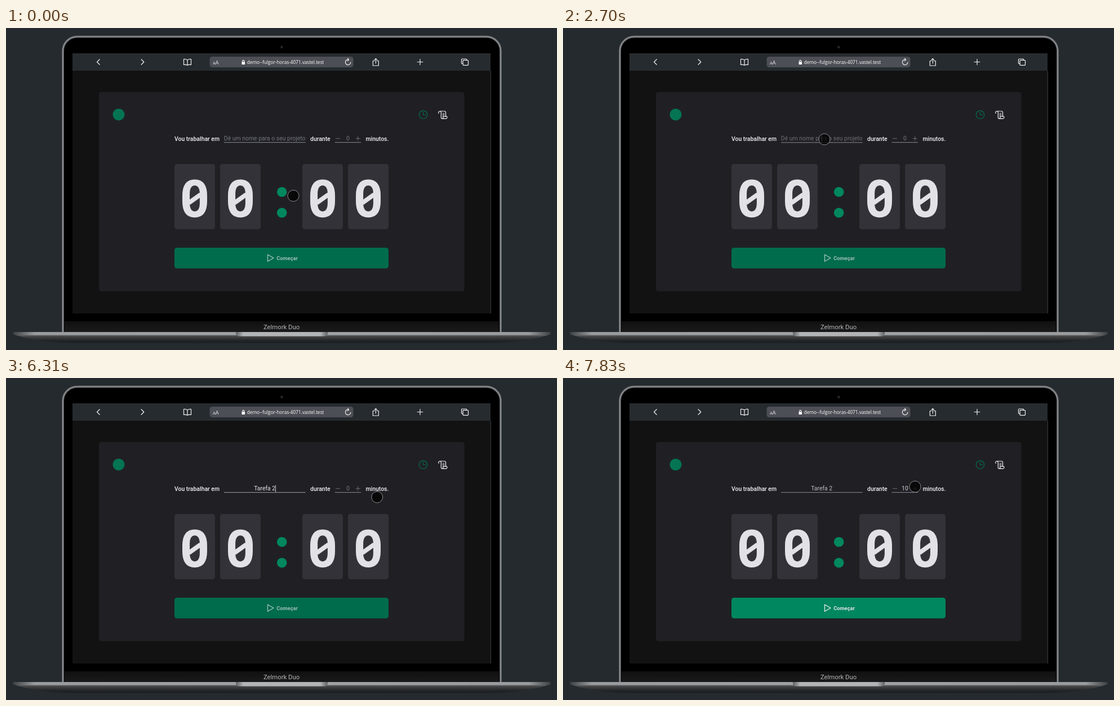
An HTML page that plays this animation: 978x573 px, repeating every 8 s.

```html
<!DOCTYPE html>
<html lang="pt-BR">
<head>
<meta charset="utf-8">
<title>Timer</title>
<style>
  html, body { margin: 0; width: 100%; height: 100%; overflow: hidden; background: #242a2e; }
  svg { display: block; width: 100%; height: 100%; }
  text { font: 10.43px Roboto, sans-serif; fill: #e1e1e6; white-space: pre; }
  .label { font-weight: 500; fill: #f0f0f5; }
  .mid { text-anchor: middle; }
  .muted { fill: #74747f; }
  .icon { fill: none; stroke: #f2f2f4; stroke-width: 1.2; stroke-linecap: round; stroke-linejoin: round; }
  .rule { fill: #7c7c8a; }
  #url { font: 8.2px "Open Sans", sans-serif; fill: #fff; }
  #model { font-size: 11.3px; fill: #b4b5b6; }
  #start text { font-size: 9.27px; font-weight: 700; }
</style>
</head>
<body>
<svg viewBox="0 0 978 573">
  <defs>
    <linearGradient id="chin" x2="0" y2="1">
      <stop stop-color="#101011"/><stop offset="1" stop-color="#1b1b1c"/>
    </linearGradient>
    <linearGradient id="deck">
      <stop stop-color="#3d4042"/><stop offset=".04" stop-color="#999b9d"/>
      <stop offset=".5" stop-color="#a0a2a4"/>
      <stop offset=".96" stop-color="#999b9d"/><stop offset="1" stop-color="#3d4042"/>
    </linearGradient>
    <linearGradient id="belly" x2="0" y2="1">
      <stop stop-color="#707274"/><stop offset=".25" stop-color="#434547"/>
      <stop offset=".7" stop-color="#232527"/><stop offset="1" stop-color="#1b1e20"/>
    </linearGradient>
    <linearGradient id="notch">
      <stop stop-color="#5d5f62"/><stop offset=".08" stop-color="#b2b4b6"/>
      <stop offset=".92" stop-color="#b2b4b6"/><stop offset="1" stop-color="#5d5f62"/>
    </linearGradient>
    <clipPath id="lidClip"><path d="M0 0H978V541H0Z"/></clipPath>
    <g id="card">
      <rect x="-36" y="-61.3" width="72" height="116" rx="4.6" fill="#323238"/>
      <path fill="#e1e1e6" fill-rule="evenodd" d="M-22-5.2Q-22-19.3-16.4-26.6T0-33.9Q10.8-33.9 16.4-26.6T22-5.2V5.2Q22 19.3 16.4 26.6T0 33.9Q-10.8 33.9-16.4 26.6T-22 5.2Z
        M-8.9-8V8Q-8.9 15.5-6.6 19.3T0 23.1Q4.3 23.1 6.6 19.3T8.9 8V-8Q8.9-15.500 6.6-19.3T0-23.1Q-4.3-23.1-6.6-19.3T-8.9-8Z"/>
      <path d="M-10.500 8L10.500-7" stroke="#e1e1e6" stroke-width="8"/>
    </g>
  </defs>

  <rect width="978" height="573" fill="#242a2e"/>

  <g clip-path="url(#lidClip)">
    <rect x="99" y="13.5" width="781" height="570" rx="27" fill="#5a5c5f"/>
    <rect x="100.9" y="15.4" width="777.2" height="570" rx="25.3" fill="none" stroke="#8d8f92" stroke-width="1.7"/>
    <rect x="103" y="17.5" width="773" height="570" rx="23" fill="#000"/>
    <rect x="104" y="522" width="771" height="20" fill="url(#chin)"/>
  </g>
  <circle cx="489.3" cy="34" r="2.4" fill="#232427"/>
  <text id="model" class="mid" x="489" y="536">Zelmork Duo</text>

  <path d="M13 545C40 555 80 560.5 130 560.5H848C898 560.5 938 555 966 545Z" fill="url(#belly)"/>
  <path d="M12.5 541H966.5V544Q966 546.5 960 546.5H19Q13 546.5 12.5 544Z" fill="url(#deck)"/>
  <path d="M408 541H571V543Q571 548.5 564 548.5H415Q408 548.5 408 543Z" fill="url(#notch)"/>

  <rect x="118" y="76" width="742" height="432" fill="#121212"/>
  <rect x="118" y="45" width="742" height="31" fill="#262b2f"/>
  <path d="M860.3 76V508" stroke="#404347"/>

  <rect x="361.5" y="51" width="255" height="19" rx="4.5" fill="#4c4f55"/>
  <text x="367" y="65" style="font-size:7.5px">A</text>
  <text x="371.5" y="65" style="font-size:9.5px">A</text>
  <rect x="418.5" y="60.3" width="5.6" height="4.8" rx=".8" fill="#fff"/>
  <path class="icon" d="M419.7 60.5V59a1.6 1.6 0 0 1 3.2 0V60.5"/>
  <text id="url" class="mid" x="496" y="64">demo--fulgor-horas-4071.vastel.test</text>
  <g class="icon">
    <path d="M166.3 55.8L161.5 60.5L166.3 65.2M240 55.8L244.8 60.5L240 65.2"/>
    <path d="M322 57Q319 55 315.5 55.5V65.3Q319 64.8 322 66.3Q325 64.8 328.5 65.3V55.5Q325 55 322 57V66"/>
    <path d="M608 56.3A4.7 4.7 0 1 0 611.8 61M606.5 54.2L608.6 56.4L606.3 58.6"/>
    <path d="M654 58.5H651.3V67H661.3V58.5H658.7M656.3 63V54.5M653.8 56.8L656.3 54.3L658.8 56.8"/>
    <path d="M735 55.7V65.3M730.2 60.5H739.8"/>
    <path d="M810.8 63.5H809.5Q808.5 63.5 808.5 62.5V56Q808.5 55 809.5 55H816.5Q817.5 55 817.5 56V57"/>
    <rect x="811" y="57.3" width="9.5" height="9" rx="1.3"/>
  </g>

  <rect x="165" y="114" width="648.5" height="354.5" rx="4.6" fill="#202024"/>
  <circle cx="200" cy="154" r="10.5" fill="#047453"/>
  <g class="icon" style="stroke:#04704f">
    <circle cx="740.5" cy="154.3" r="7.2"/><path d="M740.5 150V154.5H744.8"/>
  </g>
  <path class="icon" d="M768.2 151.8A2.3 2.3 0 1 1 772.3 150.3V159A2.3 2.3 0 0 0 774.6 161.3H780.8A2.3 2.3 0 0 0 782.4 157.4H775.3A2.3 2.3 0 0 1 774.6 161.3
    M770 148H778.2A2.3 2.3 0 0 1 780.5 150.3V157.4M775 152H778M775 154.7H778"/>

  <text class="label" x="299" y="200.7">Vou trabalhar em</text>
  <text id="hint" class="muted mid" x="459.2" y="200">Dê um nome para o seu projeto</text>
  <text id="task" y="200"></text>
  <rect id="caret" y="190.5" width=".8" height="12.5" fill="#e1e1e6"/>
  <rect id="line" class="rule" x="387" y="203" width="144.7" height="1.15"/>
  <text class="label" x="540" y="200.7">durante</text>
  <rect class="rule" x="583.7" y="203" width="46.3" height="1.15"/>
  <path d="M585 196.700H593M620.7 196.700H628.7M624.7 192.700V200.7" stroke="#74747f" stroke-width=".9"/>
  <text id="minutes" class="mid" x="606.9" y="200">0</text>
  <text class="label" x="638.5" y="200.7">minutos.</text>

  <use href="#card" x="335" y="303.3"/>
  <use href="#card" x="416" y="303.3"/>
  <use href="#card" x="562" y="303.3"/>
  <use href="#card" x="643" y="303.3"/>
  <g fill="#00875f"><circle cx="489.7" cy="291.7" r="8.8"/><circle cx="489.7" cy="328.7" r="8.8"/></g>

  <g id="start">
    <rect id="face" x="299" y="391" width="380" height="36.8" rx="4.6"/>
    <g id="caption">
      <path class="icon" d="M464.5 403.3V415.3L475 409.3Z"/>
      <text x="480.3" y="412.7">Começar</text>
    </g>
  </g>

  <g id="cursor">
    <circle r="10" fill="#000" fill-opacity=".75" stroke="#8b8b8d"/>
    <circle id="press" r="8" fill="#8c8900"/>
  </g>
</svg>
<script>
const LOOP = 8000, STEP = 70, FIELD_CENTER = 459.2;
const $ = id => document.getElementById(id);
const pen = document.createElement('canvas').getContext('2d');
const between = (t, a, b) => t >= a && t < b;
const latest = (list, t) => list.filter(item => item[0] <= t).pop();

const typing = [[0, ''], [2960, 'T'], [3180, 'Ta'], [3580, 'Tar'], [3710, 'Tare'],
  [4110, 'Taref'], [4180, 'Tarefa'], [4440, 'Tarefa '], [4970, 'Tarefa 2']];
const counter = [[0, '0'], [7290, '5'], [7830, '10']];
const caretOn = [[1620, 2170], [2700, 5500], [6060, 6590], [7120, 7150]];
const pressed = [[1620, 1760], [7150, 7290], [7700, 7830]];

// time, button colour, caption opacity
const button = [[0, '#006c4c', .7], [7360, '#007a56', .85], [7500, '#00875f', 1]];

// time, x, y
const path = [[650, 510, 298.5], [1420, 464, 198], [6030, 464, 198], [6240, 612, 210],
  [6310, 658.7, 212], [6380, 668, 212], [6520, 664, 211], [6800, 636, 201],
  [7010, 627, 193], [7150, 625.5, 191.5], [7360, 625.5, 191.7], [7500, 625, 193.3]];

function tick(t) {
  const anchor = t < 5000 ? 720 : 6310;
  return anchor + Math.floor((t - anchor) / STEP) * STEP;
}

function cursorAt(t) {
  const next = path.findIndex(p => p[0] > t);
  if (next === 0) return path[0].slice(1);
  if (next < 0) return path[path.length - 1].slice(1);
  const [t0, x0, y0] = path[next - 1], [t1, x1, y1] = path[next];
  let k = (t - t0) / (t1 - t0);
  if (next === 1) k = k * k * (3 - 2 * k);
  return [x0 + (x1 - x0) * k, y0 + (y1 - y0) * k];
}

function draw(t) {
  const inAny = spans => spans.some(([a, b]) => between(t, a, b));
  const [x, y] = cursorAt(tick(t));
  $('cursor').setAttribute('transform', `translate(${x} ${y})`);
  $('press').style.display = inAny(pressed) ? '' : 'none';

  const text = latest(typing, t)[1];
  const hovered = between(t, 1280, 6130), focused = between(t, 1620, 7150);
  pen.font = '10.43px Roboto, sans-serif';
  const width = pen.measureText(text).width;
  const task = $('task');
  task.textContent = text;
  task.setAttribute('x', FIELD_CENTER - width / 2);
  task.style.fill = hovered ? '#8f8f95' : focused ? '#e8e8ed' : '#bdbdc4';
  task.style.stroke = hovered ? '#8f8f95' : 'none';
  task.style.strokeWidth = .25;
  $('hint').style.display = text ? 'none' : '';
  $('hint').style.opacity = hovered ? .9 : 1;

  const thick = hovered && focused;
  $('line').style.fill = thick ? '#66666d' : focused ? '#8d8d98' : '#7c7c8a';
  $('line').setAttribute('height', thick ? 1.5 : 1.15);
  $('caret').setAttribute('x', FIELD_CENTER + width / 2);
  $('caret').style.display = inAny(caretOn) ? '' : 'none';

  const minutes = latest(counter, t)[1];
  $('minutes').textContent = minutes;
  $('minutes').style.fill = minutes === '0' ? '#74747f' : '#d2d2d8';
  const [, color, opacity] = latest(button, t);
  $('face').style.fill = color;
  $('caption').style.opacity = opacity;
}

function loop(now) {
  draw(now % LOOP);
  requestAnimationFrame(loop);
}
draw(0);
requestAnimationFrame(loop);
</script>
</body>
</html>
```
